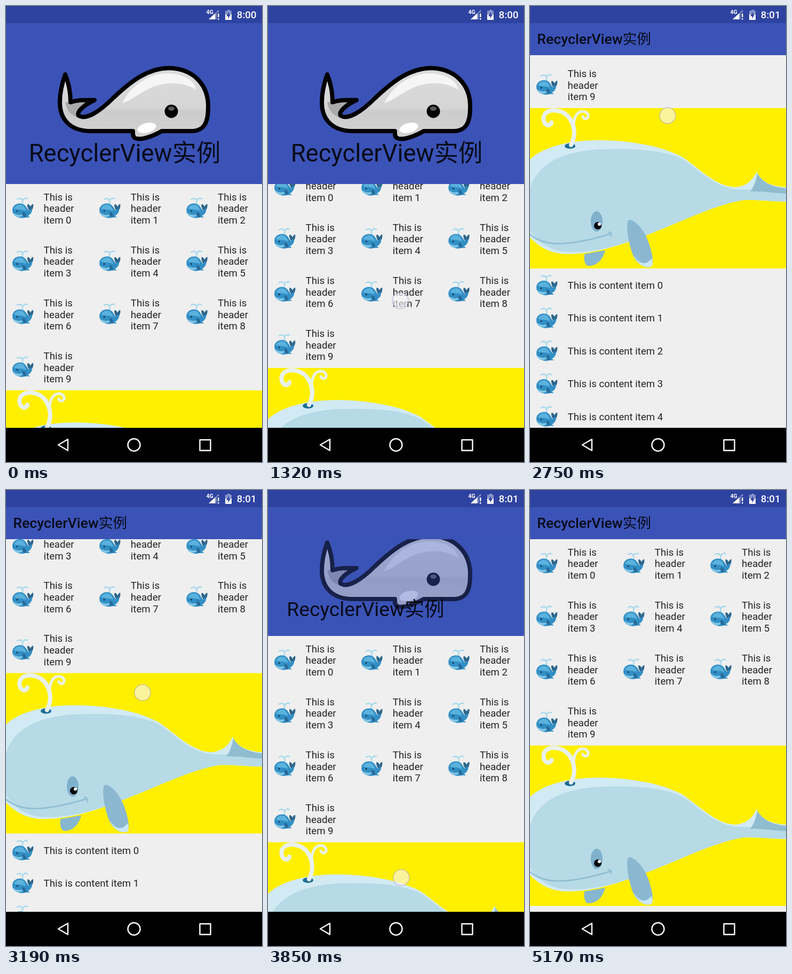
Recreate the animation shown at these times as an HTML page with a canvas. Size 480 px wide and 853 px high, loop 5.28 s.

```html
<!DOCTYPE html>
<html lang="zh">
<head>
<meta charset="utf-8">
<style>
  html, body { margin: 0; width: 100%; height: 100%; overflow: hidden; background: #000; }
  canvas { display: block; }
</style>
</head>
<body>
<canvas id="stage" width="480" height="853"></canvas>
<script>
const ctx = document.getElementById('stage').getContext('2d');
const LOOP = 5280, STEP = 110;
const EXPANDED = 333, COLLAPSED = 92, RANGE = EXPANDED - COLLAPSED;
const GRID_HEIGHT = 386, BANNER_HEIGHT = 300, ROW = 61.4;
const BLUE = '#3b53b7', FONT = 'Roboto, "Noto Sans CJK SC", sans-serif';

// Tracks are [time, value, ...] points joined by straight lines.
const listScroll = [[0, 0], [110, 0], [220, 60], [440, 325], [550, 388], [660, 395], [770, 386],
  [880, 345], [1320, 42], [1540, 0]];
const appBarScroll = [[1870, 0], [2090, 12], [2200, 27], [2310, 85], [2640, 480], [2750, 528], [2860, 538],
  [2970, 510], [3410, 243], [3520, 201], [3740, 85], [3850, 60], [3960, 60], [4180, 118],
  [4290, 161], [4400, 196], [4510, 228], [4620, 241]];
const scrim = [[2310, 0], [2750, 1], [3520, 1], [4070, 0], [4400, 0], [4950, 1]];
const touches = [
  [[110, 238, 590], [220, 238, 530], [440, 240, 268], [550, 241, 204], [660, 241, 199],
    [770, 242, 207], [880, 243, 248], [1320, 248, 551], [1430, 248, 585]],
  [[1870, 231, 688], [2090, 232, 674], [2200, 233, 659], [2310, 237, 605], [2640, 255, 240],
    [2750, 258, 205], [2860, 258, 200], [2970, 258, 228], [3410, 254, 530], [3520, 253, 584],
    [3740, 251, 700], [3850, 250, 725]]
];

function sample(track, t, column = 1) {
  const next = track.findIndex(p => p[0] > t);
  if (next === 0) return track[0][column];
  if (next < 0) return track[track.length - 1][column];
  const a = track[next - 1], b = track[next];
  return a[column] + (b[column] - a[column]) * (t - a[0]) / (b[0] - a[0]);
}

const lerp = (a, b, k) => a + (b - a) * k;

function fill(color, path) {
  ctx.fillStyle = color;
  ctx.fill(new Path2D(path));
}

function stroke(color, width, path) {
  ctx.strokeStyle = color;
  ctx.lineWidth = width;
  ctx.stroke(new Path2D(path));
}

function box(color, x, y, w, h) {
  ctx.fillStyle = color;
  ctx.fillRect(x, y, w, h);
}

function oval(color, x, y, rx, ry = rx, turn = 0) {
  ctx.fillStyle = color;
  ctx.beginPath();
  ctx.ellipse(x, y, rx, ry, turn, 0, 2 * Math.PI);
  ctx.fill();
}

function text(color, size, x, y, string, weight = 400) {
  ctx.font = `${weight} ${size}px ${FONT}`;
  ctx.fillStyle = color;
  ctx.fillText(string, x, y);
}

function at(x, y, draw) {
  ctx.save();
  ctx.translate(x, y);
  draw();
  ctx.restore();
}

function icon() {
  stroke('#a9d9ec', 2.5, 'M0 -8V-14Q-4 -20 -10 -16M0 -14Q5 -20 9 -17');
  fill('#2d668c', 'M11 3C9 -2 8 -5 10 -7C13 -6 14 -4 15 -2C16 -5 18 -7 20 -7C21 -2 19 4 15 7Z');
  fill('#328fc5', 'M-19 6C-20 -4 -11 -9 -3 -8C7 -7 8 3 12 5C14 5 15 3 15 1L18 3C18 9 14 13 10 15L14 18L5 18C-1 21 -18 18 -19 6Z');
  fill('#5bb2dd', 'M-16 2C-14 -5 -5 -8 1 -4C5 0 6 4 7 6C0 3 -9 3 -16 2Z');
  fill('#83c7e6', 'M-18 9C-11 14 -5 14 0 12C0 17 -6 18 -9 17C-14 16 -17 13 -18 9Z');
  fill('#276a98', 'M0 8C5 8 8 13 6 18C1 17 -1 12 0 8Z');
  oval('#173b55', -10, 6, 1.6);
}

function banner() {
  box('#fff000', 0, 0, 480, BANNER_HEIGHT);
  fill('#87b6d0', 'M102 273L141 266C136 285 124 296 108 295C102 292 101 284 102 273Z');
  fill('#d1eaf4', `M0 96C25 72 75 60 130 60C195 61 248 72 285 91C318 113 347 146 385 148
    C408 146 418 133 425 119C433 138 452 146 480 148V175C450 175 425 171 400 172
    C345 181 285 212 225 235C170 257 120 273 70 273C38 273 15 258 0 242Z`);
  fill('#b6dae6', `M0 151C12 110 50 82 130 77C200 75 255 78 290 98C322 121 350 150 390 152L480 153V174
    C450 175 425 171 400 172C345 181 285 212 225 235C170 257 120 271 70 269C38 268 12 250 0 228Z`);
  fill('#90bcd0', 'M426 122C424 138 418 149 413 156C435 155 455 159 480 160V150C455 148 437 140 426 122Z');
  stroke('#8fbdd1', 2.5, 'M0 236C25 258 65 261 152 235M147 232Q154 233 152 240');
  oval('#7fb1cc', 125, 212, 11, 19);
  oval('#050709', 127, 220, 7);
  oval('#fff', 130, 217, 3);
  fill('#8bb8d0', 'M183 212C188 202 211 220 222 250C232 280 232 292 226 297C215 301 200 290 195 279C187 262 180 230 183 212Z');
  fill('#cce7f3', 'M194 275C204 291 217 296 228 281C231 290 230 296 226 297C215 301 200 290 194 275Z');
  oval('#1f6e93', 75, 71, 10, 5);
  stroke('#e9f1ee', 8, 'M77 69C86 52 84 34 75 20C64 4 43 1 31 8C21 16 25 33 36 32Q40 30 40 27');
  stroke('#e9f1ee', 5, 'M82 42C80 20 87 7 98 6C109 6 113 17 105 20Q100 20 99 16');
}

function headerWhale() {
  const outline = new Path2D(`M111 128C118 145 121 162 121 180C135 175 150 176 166 176
    C148 184 132 197 136 205C150 214 176 197 200 173C235 140 265 117 305 116
    C352 117 380 148 379 190C379 220 370 233 350 234H292C275 244 252 252 242 247
    C237 244 238 239 238 234H160C120 234 101 212 101 180C101 160 105 145 111 128Z`);
  const shade = ctx.createLinearGradient(0, 116, 0, 245);
  [[0, '#dcdcdc'], [.58, '#d5d5d5'], [.62, '#cccccc'], [1, '#d2d2d2']].forEach(s => shade.addColorStop(...s));
  ctx.fillStyle = shade;
  ctx.fill(outline);
  fill('#aaaaaa', 'M111 180L121 179L160 177C140 187 130 198 134 208C121 205 113 194 111 180Z');
  fill('#f5f5f5', 'M218 182C232 151 268 125 305 126C336 127 355 142 357 157C339 145 312 141 286 148C261 154 241 174 218 182Z');
  ctx.strokeStyle = '#000';
  ctx.lineWidth = 8;
  ctx.stroke(outline);
  oval('#fff', 264, 228, 18, 9, -.25);
  oval('#000', 310, 197, 12.5);
  oval('#5a5a5a', 310, 192, 6, 4);
}

function list(top) {
  box('#efefef', 0, 32, 480, 757);
  for (let i = 0; i < 10; i++) {
    at(i % 3 * 163.2, top + Math.floor(i / 3) * 99.1, () => {
      at(31, 44.5, icon);
      ['This is', 'header', 'item ' + i].forEach((line, n) => text('#242424', 18.67, 70.6, 30.5 + n * 21.8, line));
    });
  }
  at(0, top + GRID_HEIGHT, banner);
  const first = top + GRID_HEIGHT + BANNER_HEIGHT;
  for (let i = 0; first + i * ROW < 789; i++) {
    at(0, first + i * ROW, () => {
      at(31, 31, icon);
      text('#242424', 18.67, 70.6, 38, 'This is content item ' + i);
    });
  }
}

function appBar(bottom, scrimAlpha) {
  const k = (EXPANDED - bottom) / RANGE;
  ctx.save();
  ctx.beginPath();
  ctx.rect(0, 32, 480, bottom - 32);
  ctx.clip();
  box(BLUE, 0, 32, 480, bottom - 32);
  at(0, (bottom - EXPANDED) / 2, headerWhale);
  ctx.globalAlpha = scrimAlpha;
  box(BLUE, 0, 32, 480, bottom - 32);
  ctx.globalAlpha = 1;
  box(BLUE, 0, 32, 480, 60);
  ctx.restore();

  const size = lerp(45.33, 26.67, 1 - (1 - k) ** 2);
  const x = lerp(42.67, 13.33, k), y = lerp(290.5, 71.3, k), color = 'rgba(0,0,0,.87)';
  text(color, size, x, y, 'RecyclerView', k > .99 ? 500 : 400);
  text(color, size, x + ctx.measureText('RecyclerView').width, y, '实例');
}

function statusBar(clock) {
  box('#2e43a0', 0, 0, 480, 32);
  text('#fff', 10.5, 375.5, 15, '4G', 700);
  fill('#8794c8', 'M380 25L399 7V12H395V25Z');
  fill('#fff', 'M380 25L392 14V25Z');
  box('#fff', 397, 14, 2.5, 7);
  box('#fff', 397, 23, 2.5, 2.5);
  fill('#8794c8', 'M411 9H415V7H420V9H423V17H411Z');
  box('#fff', 411, 16, 12, 10);
  fill('#2e43a0', 'M418 11L413 19H416.5V24L421 16H418Z');
  text('#fff', 18.67, 432.8, 23.3, clock, 500);
}

function navBar() {
  box('#000', 0, 789, 480, 64);
  stroke('#fff', 2.4, 'M98 821L116 810.5V831.5ZM363.5 811.5H383.5V831.5H363.5ZM251.5 821A11.5 11.5 0 1 1 228.5 821A11.5 11.5 0 1 1 251.5 821Z');
}

function touchDot(t) {
  const track = touches.find(p => t >= p[0][0] && t <= p[p.length - 1][0]);
  if (!track) return;
  oval('rgba(247,247,250,.62)', sample(track, t), sample(track, t, 2), 15);
  ctx.strokeStyle = 'rgba(165,155,200,.55)';
  ctx.lineWidth = 1.5;
  ctx.stroke();
}

function frame(now) {
  const t = Math.floor(now % LOOP / STEP) * STEP;
  const offset = sample(appBarScroll, t);
  const bottom = EXPANDED - Math.min(offset, RANGE);
  const scrolled = sample(listScroll, t) + Math.max(0, offset - RANGE);
  ctx.lineCap = ctx.lineJoin = 'round';
  list(bottom - scrolled);
  appBar(bottom, sample(scrim, t));
  statusBar(t < 1980 ? '8:00' : '8:01');
  navBar();
  touchDot(t);
}

const start = performance.now();
function tick() {
  frame(performance.now() - start);
  requestAnimationFrame(tick);
}
tick();
</script>
</body>
</html>
```
